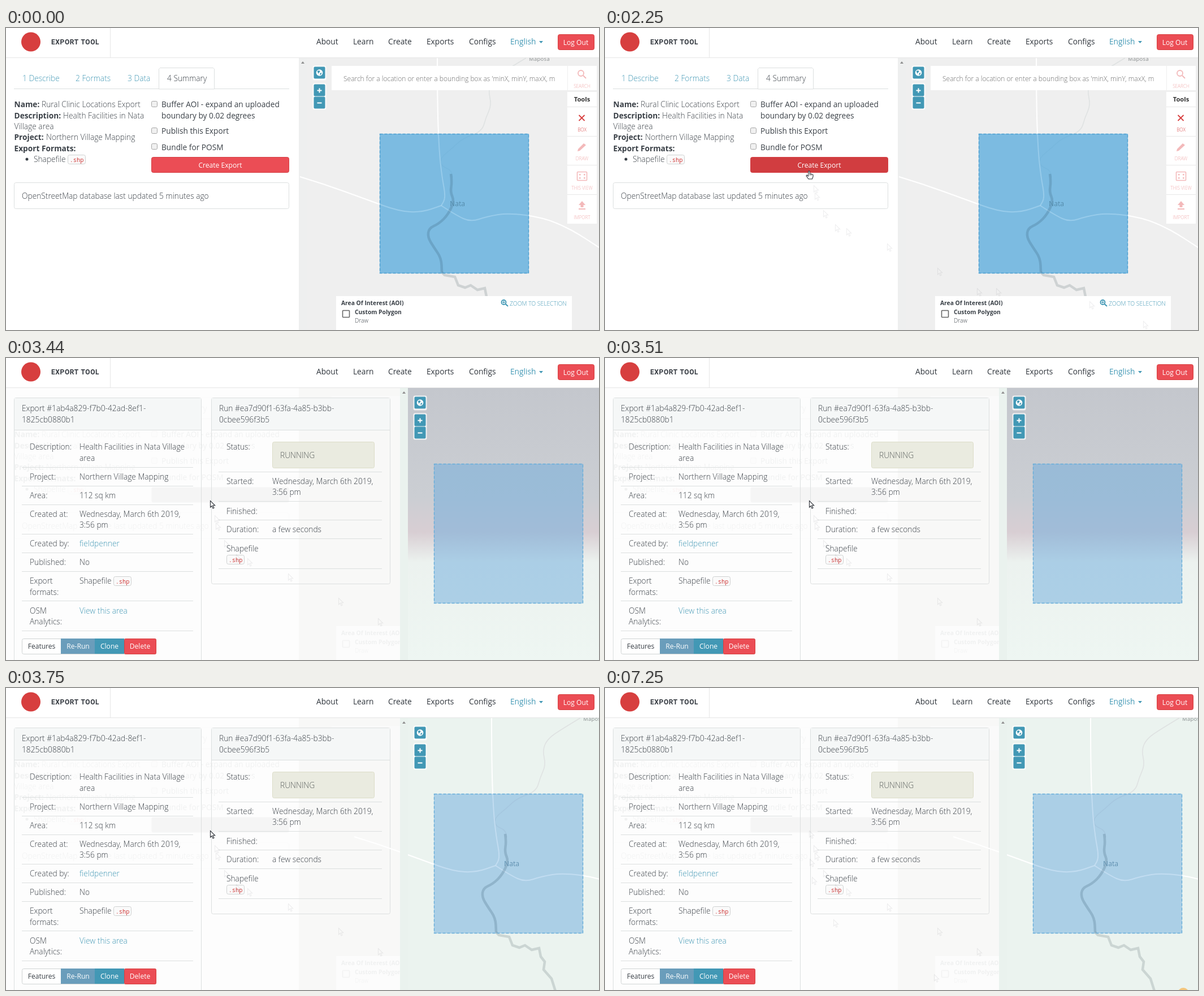
Write an HTML page with a canvas that moves like this. It is 1049 by 534 pixels and loops after 7.4 s.

```html
<!DOCTYPE html>
<html lang="en">
<head>
<meta charset="utf-8">
<title>Export tool</title>
<style>
  html, body { margin: 0; width: 100%; height: 100%; overflow: hidden; background: #fff; }
  canvas { display: block; }
</style>
</head>
<body>
<canvas id="stage" width="1049" height="534"></canvas>
<script>
const ctx = document.getElementById('stage').getContext('2d');
const LOOP = 7400, SUBMIT = 2660, NEW_PAGE = 3440, MAP_READY = 3750;
const INK = '#3a4047', BLUE = '#4298b5', RED = '#eb4d55', RULE = '#dcdfdf', PINK = '#f3b9ba';

const sans = '"Open Sans", sans-serif';
const fonts = {
  body: `300 13.75px ${sans}`,
  regular: `400 13.7px ${sans}`,
  bold: `700 13.7px ${sans}`,
  button: `400 12.1px ${sans}`,
  search: `300 12px ${sans}`,
  smallBold: `700 10.3px ${sans}`,
  small: `300 10.3px ${sans}`,
  tools: `700 11.2px ${sans}`,
  tiny: `300 8.2px ${sans}`,
  place: `400 12.2px ${sans}`,
  hamlet: `400 9.5px ${sans}`,
  brand: '700 12px Roboto, sans-serif',
  code: '400 10.3px "Noto Sans Mono", monospace'
};

// Arrow or hand pointer: time, x, y
const moves = [
  [620, 952, 518], [700, 857, 483], [770, 692, 460], [850, 658, 460],
  [1230, 588, 424], [1310, 499, 381], [1390, 427, 354], [1470, 407, 347],
  [1720, 386, 322], [1800, 371, 291], [1870, 369, 278], [1950, 361, 252],
  [5850, 362, 302], [5930, 366, 334], [6000, 404, 409], [6080, 582, 506], [6150, 806, 522]
];
const POINTER_GONE = 6230;

const clamp01 = v => Math.max(0, Math.min(1, v));
const mix = (a, b, k) => `rgb(${a.map((v, i) => Math.round(v + (b[i] - v) * k))})`;

function text(str, x, y, font = 'body', color = INK, align = 'left', spacing = 0) {
  ctx.font = fonts[font];
  ctx.fillStyle = color;
  ctx.textAlign = align;
  ctx.letterSpacing = spacing + 'px';
  ctx.fillText(str, x, y);
}

function rect(x, y, w, h, color) {
  ctx.fillStyle = color;
  ctx.fillRect(x, y, w, h);
}

function box(x, y, w, h, fill, stroke, r = 3, width = 1) {
  ctx.beginPath();
  ctx.roundRect(x + .5, y + .5, w - 1, h - 1, r);
  if (fill) { ctx.fillStyle = fill; ctx.fill(); }
  if (stroke) { ctx.strokeStyle = stroke; ctx.lineWidth = width; ctx.stroke(); }
}

function poly(points, color, width, fill) {
  ctx.beginPath();
  points.forEach(([x, y]) => ctx.lineTo(x, y));
  if (fill) { ctx.closePath(); ctx.fillStyle = fill; ctx.fill(); }
  if (color) { ctx.strokeStyle = color; ctx.lineWidth = width; ctx.stroke(); }
}

function curve(points, color, width) {
  ctx.beginPath();
  ctx.moveTo(...points[0]);
  for (let i = 1; i < points.length - 1; i++) {
    const [x, y] = points[i], [nx, ny] = points[i + 1];
    ctx.quadraticCurveTo(x, y, (x + nx) / 2, (y + ny) / 2);
  }
  ctx.lineTo(...points.at(-1));
  ctx.strokeStyle = color;
  ctx.lineWidth = width;
  ctx.stroke();
}

function disc(x, y, r, color) {
  ctx.beginPath();
  ctx.arc(x, y, r, 0, 2 * Math.PI);
  ctx.fillStyle = color;
  ctx.fill();
}

function ring(x, y, r, color, width) {
  ctx.beginPath();
  ctx.arc(x, y, r, 0, 2 * Math.PI);
  ctx.strokeStyle = color;
  ctx.lineWidth = width;
  ctx.stroke();
}

function codeTag(x, y) {
  box(x, y, 32, 17, '#fafafa', '#cfd2d2');
  text('.shp', x + 16, y + 12.5, 'code', '#d03a3a', 'center');
}

function header() {
  rect(0, 0, 1049, 53, '#fff');
  rect(0, 52, 1049, 1, '#e6e6e6');
  rect(184, 0, 1, 52, '#e6e6e6');
  disc(44, 24.5, 17, '#d73f3f');
  text('EXPORT TOOL', 80, 29, 'brand', '#363b42', 'left', .6);
  [['About', 549], ['Learn', 614], ['Create', 676], ['Exports', 744], ['Configs', 819]]
    .forEach(([label, x]) => text(label, x, 29, 'regular', '#2f353c'));
  text('English', 892, 29, 'regular', BLUE);
  poly([[943, 23], [950, 23], [946.5, 27]], null, 0, BLUE);
  box(976, 11, 65, 28, RED, '#d73f3f');
  text('Log Out', 1008, 29.5, 'button', '#fff', 'center');
}

function form(buttonColor, pressed) {
  rect(14, 107, 487, 1, RULE);
  poly([[270.5, 108], [270.5, 72.5], [272.5, 70.5], [366.5, 70.5], [368.5, 72.5], [368.5, 108]], RULE, 1, '#fff');
  [['1 Describe', 29], ['2 Formats', 123], ['3 Data', 215]]
    .forEach(([label, x]) => text(label, x, 94, 'body', BLUE));
  text('4 Summary', 285, 94);

  text('Name:', 14.5, 140, 'bold');
  text('Rural Clinic Locations Export', 63, 140);
  text('Description:', 14.5, 159.5, 'bold');
  text('Health Facilities in Nata', 101, 159.5);
  text('Village area', 14.5, 179);
  text('Project:', 14.5, 198, 'bold');
  text('Northern Village Mapping', 71, 198);
  text('Export Formats:', 14.5, 217.5, 'bold');
  disc(37, 232, 2.5, INK);
  text('Shapefile', 49, 237);
  codeTag(109, 224);

  [129, 176, 204].forEach(y => box(257, y, 11, 11, '#f0f0f0', '#a5a5a5', 2));
  text('Buffer AOI - expand an uploaded', 275, 140, 'regular');
  text('boundary by 0.02 degrees', 275, 159.5, 'regular');
  text('Publish this Export', 275, 187, 'regular');
  text('Bundle for POSM', 275, 215.5, 'regular');

  box(257, 228, 244, 28, buttonColor, pressed ? null : '#d44045');
  text('Create Export', 379, 247, 'button', '#fff', 'center');
  box(14, 273, 487, 47, null, RULE);
  text('OpenStreetMap database last updated 5 minutes ago', 28, 301.5);
}

function areaPanel() {
  rect(584, 474, 417, 60, '#fff');
  text('Area Of Interest (AOI)', 593, 489.5, 'smallBold');
  box(595, 499, 13, 13, null, '#666', 1, 1.6);
  text('Custom Polygon', 617, 506, 'smallBold');
  text('Draw', 617, 520.5, 'small');
  ring(880.5, 485, 4, BLUE, 1.8);
  poly([[883.5, 488], [888, 492]], BLUE, 2.2);
  poly([[878, 485], [883, 485]], BLUE, 1.2);
  poly([[880.5, 482.5], [880.5, 487.5]], BLUE, 1.2);
  text('ZOOM TO SELECTION', 891, 490.5, 'small', BLUE);
}

function zoomButtons(x) {
  box(x - 2, 66, 25, 27, 'rgba(255,255,255,.75)');
  box(x - 2, 97, 25, 48, 'rgba(255,255,255,.75)');
  [68, 99, 121].forEach(y => box(x, y, 21, 22, BLUE, null, 2));
  const cx = x + 10.5;
  disc(cx, 79, 5.8, '#fff');
  poly([[cx - 4, 76], [cx, 75], [cx + 1, 77.5], [cx - 1, 79], [cx - 2, 81]], null, 0, BLUE);
  poly([[cx + 1, 80], [cx + 4, 79], [cx + 3, 82], [cx + 1, 83.5]], null, 0, BLUE);
  [110, 132].forEach(y => poly([[cx - 4, y + .5], [cx + 4, y + .5]], '#fff', 2));
  poly([[cx, 106.5], [cx, 114.5]], '#fff', 2);
}

function mapTools() {
  rect(576, 67, 469, 43, '#fff');
  rect(993, 67, 1, 43, '#eee');
  text("Search for a location or enter a bounding box as 'minX, minY, maxX, m", 597, 93.5, 'search', '#6d6d6d');
  rect(993, 113, 52, 233, '#fff');
  [139, 191, 242, 294].forEach(y => rect(993, y, 52, 1, '#e8e8e8'));
  ring(1017, 80, 5, PINK, 1.8);
  poly([[1021, 84], [1026, 89]], PINK, 2);
  text('Tools', 1019, 130, 'tools', '#333', 'center');
  poly([[1013.5, 154], [1023.5, 164]], '#d73f3f', 1.8);
  poly([[1023.5, 154], [1013.5, 164]], '#d73f3f', 1.8);
  poly([[1011, 218], [1012, 214], [1022, 204], [1026, 207], [1015, 217]], null, 0, PINK);
  box(1010, 254, 18, 16, null, PINK, 1, 1.6);
  [[1014, 258], [1022, 258], [1014, 264], [1022, 264]].forEach(([x, y]) => rect(x, y, 2.5, 2.5, PINK));
  poly([[1019, 306], [1025, 313], [1021.5, 313], [1021.5, 317], [1016.5, 317], [1016.5, 313], [1013, 313]], null, 0, PINK);
  rect(1013, 319, 12, 2, PINK);
  [['SEARCH', 105.5], ['BOX', 182.5], ['DRAW', 234], ['THIS VIEW', 285.5], ['IMPORT', 337.5]]
    .forEach(([label, y]) => text(label, 1019, y, 'tiny', label === 'BOX' ? '#d73f3f' : '#efa5a6', 'center'));
}

const roads = [
  [[763, 50], [763, 130], [766, 215], [771, 262], [778, 300], [770, 314]],
  [[520, 263], [560, 275], [640, 304], [695, 324], [735, 326], [770, 314]],
  [[770, 314], [796, 331], [822, 343], [852, 333], [889, 327], [950, 335], [1000, 356], [1052, 390]]
];
const stream = [[920, 53], [885, 74], [862, 90], [853, 110], [859, 136], [849, 158], [842, 183],
  [808, 195], [789, 213], [768, 230], [770, 244], [787, 251], [790, 264]];
const river = [[787, 258], [789, 272], [786, 290], [793, 306], [782, 330], [766, 346], [748, 354],
  [746, 370], [757, 388], [770, 407], [771, 432]];
const lowerRiver = [[771, 432], [776, 437], [794, 440], [800, 455], [812, 459], [822, 455], [834, 463],
  [847, 460], [850, 475], [857, 484], [855, 498], [869, 514], [876, 536]];

function mapArea(dx, ground, fill, tiles) {
  const tiled = draw => { ctx.globalAlpha = tiles; draw(); ctx.globalAlpha = 1; };
  ctx.save();
  ctx.translate(dx, 0);
  tiled(() => {
    rect(532 + (dx ? 83 : 0), 53, 520, 481, ground);
    curve(stream, '#dfe2e2', 1.6);
    roads.forEach(r => curve(r, '#fff', 2));
    text('Maposa', 925, 58, 'hamlet', '#8b8f90', 'left', .3);
  });
  rect(661, 187, 264, 247, fill);
  tiled(() => {
    roads.forEach(r => curve(r, 'rgba(255,255,255,.18)', 2));
    curve(river, 'rgba(45,85,105,.22)', 4.5);
    poly(lowerRiver, 'rgba(45,65,75,.17)', 4.5);
    text('Nata', 785, 314.5, 'place', dx ? '#6090b0' : '#548bab');
  });
  ctx.setLineDash([5, 3]);
  ctx.strokeStyle = dx ? '#66add9' : '#4c9fd0';
  ctx.lineWidth = 1.4;
  ctx.strokeRect(661.5, 187.5, 263, 246);
  ctx.setLineDash([]);
  ctx.restore();
}

function scrollStrip(x, color) {
  rect(x, 53, 14, 481, color);
  poly([[x + 4, 63], [x + 10, 63], [x + 7, 59]], null, 0, '#8d8d8d');
}

function summaryPage(t) {
  const hover = clamp01((t - 1900) / 350), wait = clamp01((t - SUBMIT + 70) / 210);
  const color = t < SUBMIT ? mix([235, 77, 85], [209, 61, 64], hover)
                           : mix([209, 61, 64], [233, 167, 141], wait);
  form(color, t >= SUBMIT);
  scrollStrip(518, '#eeefef');
  mapArea(0, '#efefef', 'rgba(76,166,220,.7)', 1);
  mapTools();
  zoomButtons(544);
  areaPanel();
}

function afterimage() {
  rect(0, 53, 697, 481, '#fdfdfd');
  rect(518, 53, 179, 481, '#f8f8f7');
  rect(576, 67, 121, 43, '#fafafa');
  rect(584, 474, 113, 60, '#fcfcfc');
  ctx.save();
  ctx.beginPath();
  ctx.rect(0, 53, 697, 481);
  ctx.clip();
  ctx.globalAlpha = .06;
  form('#777', true);
  areaPanel();
  ctx.restore();
}

function card(x, w, h, lines) {
  box(x, 70, w, h, null, RULE);
  rect(x + 1, 71, w - 2, 56, '#f5f7f7');
  rect(x, 127, w, 1, RULE);
  lines.forEach((line, i) => text(line, x + 14, 94 + i * 19.5));
}

function rows(x, valueX, entries) {
  entries.forEach(([y, label, value = '', color = INK]) => {
    text(label, x, y);
    text(value, valueX, y, 'body', color);
  });
}

function runPage(t) {
  afterimage();
  card(14, 332, 480, ['Export #1ab4a829-f7b0-42ad-8ef1-', '1825cb0880b1']);
  rows(42, 130, [
    [162, 'Description:', 'Health Facilities in Nata Village'], [181.5, '', 'area'],
    [215, 'Project:', 'Northern Village Mapping'],
    [248, 'Area:', '112 sq km'],
    [281, 'Created at:', 'Wednesday, March 6th 2019,'], [300, '', '3:56 pm'],
    [333, 'Created by:', 'fieldpenner', BLUE],
    [366, 'Published:', 'No'],
    [399, 'Export', 'Shapefile'], [418.5, 'formats:'],
    [451.5, 'OSM', 'View this area', BLUE], [471, 'Analytics:']
  ]);
  [193, 226, 259, 311, 344, 377, 429, 482].forEach(y => rect(28, y, 303, 1, RULE));
  codeTag(190, 386);

  box(28, 496, 238, 28, '#fff', '#cfd3d3');
  rect(97, 496, 60, 27, '#6a9dbb');
  rect(157, 496, 52, 27, BLUE);
  box(209, 496, 57, 28, RED, '#d73f3f', 2);
  [['Features', 63, INK], ['Re-Run', 127.5, '#fff'], ['Clone', 183, '#fff'], ['Delete', 237, '#fff']]
    .forEach(([label, x, color]) => text(label, x, 514, 'button', color, 'center'));

  card(363, 317, 330, ['Run #ea7d90f1-63fa-4a85-b3bb-', '0cbee596f3b5']);
  box(471, 148, 181, 47, '#eaebe0', '#dcddc8');
  text('RUNNING', 485, 176.5, 'body', '#5a5f5d');
  rows(390, 471, [
    [162, 'Status:'],
    [223, 'Started:', 'Wednesday, March 6th 2019,'], [242, '', '3:56 pm'],
    [275.5, 'Finished:'],
    [308, 'Duration:', 'a few seconds'],
    [341.5, 'Shapefile']
  ]);
  [201, 253, 286, 319, 372].forEach(y => rect(376, y, 289, 1, RULE));
  codeTag(390, 348);

  const loading = ctx.createLinearGradient(0, 53, 0, 534);
  [[0, '#c4c7cd'], [.4, '#cbced3'], [.53, '#d8ced3'], [.64, '#ecf2ef'], [1, '#eef6f2']]
    .forEach(stop => loading.addColorStop(...stop));
  rect(711, 53, 338, 481, loading);
  const tiles = t < 3600 ? 0 : t < 3680 ? .5 : t < MAP_READY ? .8 : 1;
  mapArea(96, '#ebf3ef', 'rgba(109,171,221,.5)', tiles);
  scrollStrip(697, '#eaf2ee');
  zoomButtons(722);
}

function arrow(x, y) {
  poly([[0, 0], [0, 11.5], [2.7, 9], [4.6, 13.4], [6.5, 12.5], [4.6, 8.3], [8.2, 8.3], [0, 0]]
    .map(([px, py]) => [x + px + .5, y + py + .5]), '#30343b', 1.1, '#fff');
}

function hand(x, y) {
  poly([[-1, 1], [1, 1], [1.5, 6], [4, 6], [7, 7.5], [7, 11], [5.5, 15], [-1, 15], [-5, 9.5], [-4, 8], [-1.5, 10], [-1, 1]]
    .map(([px, py]) => [x + px, y + py]), '#30343b', 1.1, '#fff');
  [1.5, 4].forEach(px => poly([[x + px, y + 6], [x + px, y + 9]], '#30343b', .8));
}

function pointer(t) {
  const passed = moves.filter(m => m[0] <= t);
  if (!passed.length) return;
  const [, x, y] = passed.at(-1);
  ctx.globalAlpha = .08;
  passed.slice(0, t < POINTER_GONE ? -1 : undefined)
    .filter(([, px]) => t < NEW_PAGE || px < 690)
    .forEach(([, px, py]) => arrow(px, py));
  ctx.globalAlpha = 1;
  if (t >= POINTER_GONE) return;
  if (t >= 1950 && t < SUBMIT) hand(x, y); else arrow(x, y);
}

function draw(now) {
  const t = now % LOOP;
  rect(0, 0, 1049, 534, '#fff');
  if (t < NEW_PAGE) summaryPage(t); else runPage(t);
  header();
  pointer(t);
  if (t >= 7250) disc(1023, 540, 10, '#f4c67c');
}

const start = performance.now();
function tick() {
  draw(performance.now() - start);
  requestAnimationFrame(tick);
}
tick();
</script>
</body>
</html>
```
